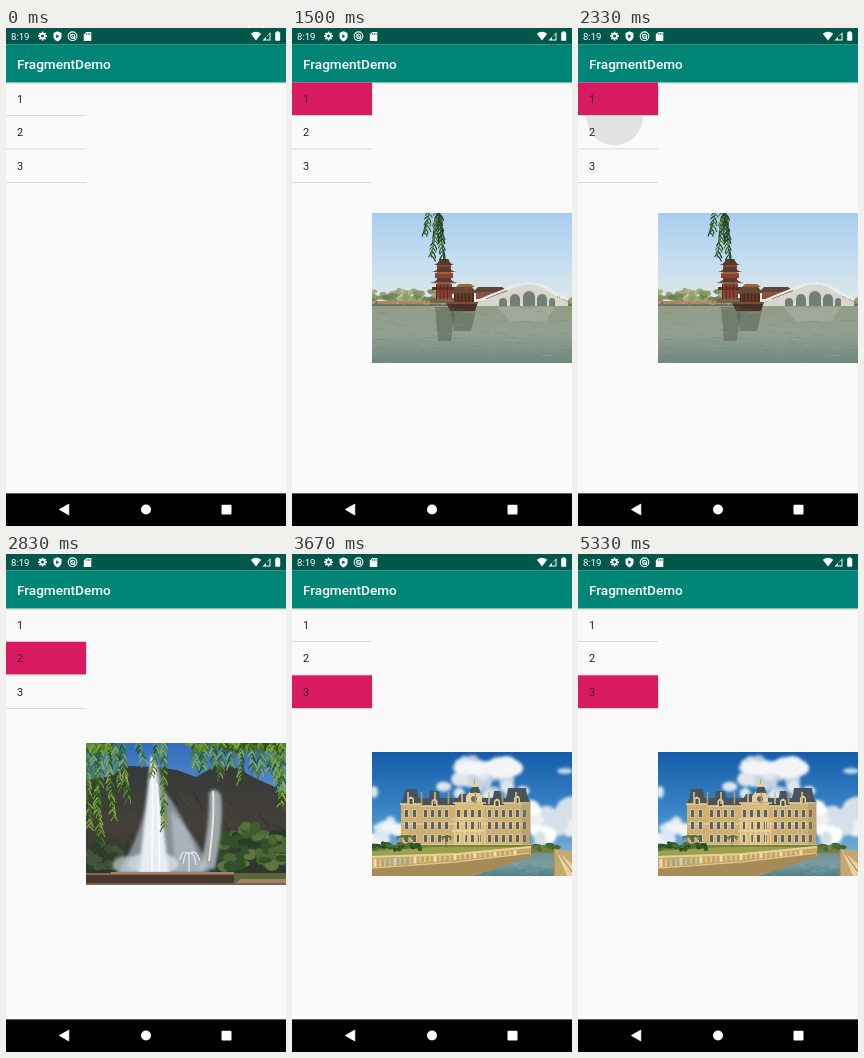
Animation of 280 by 498 pixels, one loop 5490 ms. Source, as an HTML page:

```html
<!DOCTYPE html>
<html lang="en">
<head>
<meta charset="utf-8">
<title>FragmentDemo</title>
<style>
html, body { margin: 0; width: 100%; height: 100%; overflow: hidden; background: #fafafa; }
#stage { display: block; width: 100vw; height: 100vh; }
text { font-family: Roboto, sans-serif; }
</style>
</head>
<body>
<svg id="stage" viewBox="0 0 280 498" preserveAspectRatio="none"></svg>
<script>
const LOOP = 5490;
const PICKS = [670, 2500, 3500];   // moment each row becomes active
const RIPPLE = [2330, 2500];

let seed = 7;
const rnd = (a = 0, b = 1) => {
  seed = (seed * 16807) % 2147483647;
  return a + (b - a) * seed / 2147483647;
};
const n = v => +v.toFixed(2);
const rect = (x, y, w, h, fill, more = '') =>
  `<rect x="${n(x)}" y="${n(y)}" width="${n(w)}" height="${n(h)}" fill="${fill}" ${more}/>`;
const path = (d, fill, more = '') => `<path d="${d}" fill="${fill}" ${more}/>`;
const line = (d, color, w = 1, more = '') =>
  `<path d="${d}" fill="none" stroke="${color}" stroke-width="${w}" ${more}/>`;
const oval = (x, y, rx, ry, fill, more = '') =>
  `<ellipse cx="${n(x)}" cy="${n(y)}" rx="${n(rx)}" ry="${n(ry)}" fill="${fill}" ${more}/>`;
const label = (x, y, size, fill, str, more = '') =>
  `<text x="${x}" y="${n(y)}" font-size="${size}" fill="${fill}" ${more}>${str}</text>`;
const times = (count, fn) => Array.from({ length: count }, (_, i) => fn(i)).join('');
const pick = list => list[Math.floor(rnd(0, list.length))];
const grad = (id, stops, dir = 'x2="0" y2="1"') =>
  `<linearGradient id="${id}" ${dir}>` + stops.map((c, i) =>
    `<stop offset="${i / (stops.length - 1)}" stop-color="${c}"/>`).join('') + '</linearGradient>';

// scattered blobs inside a box
const blobs = (count, x, y, w, h, r, colors, more = '') => times(count, () =>
  oval(rnd(x, x + w), rnd(y, y + h), rnd(r * .6, r * 1.3), rnd(r * .5, r), pick(colors), more));

// hanging branch with slim leaves
const branch = (x, y, len, lean, colors, size = 5) =>
  line(`M${n(x)} ${y}q${n(lean * .2)} ${n(len * .5)} ${n(lean)} ${n(len)}`, colors[0], .6) +
  times(Math.round(len / 1.9), i => {
    const k = i * 1.9 / len, side = i % 2 ? 1 : -1;
    const px = x + lean * k * (.4 + .6 * k), py = y + len * k;
    return line(`M${n(px)} ${n(py)}q${side * 2} 1 ${n(side * rnd(2, size * .8))} ${n(rnd(size * .6, size * 1.3))}`,
      pick(colors), 1.2, 'stroke-linecap="round"');
  });

const photo = (y, h, body) =>
  `<g class="photo" display="none"><svg x="80" y="${y}" width="200" height="${h}" viewBox="80 ${y} 200 ${h}">${body}</svg></g>`;

function lake() {
  const roof = (x, y, w, h) => path(
    `M${x - w} ${y + h}Q${x - w * .5} ${y + h * .7} ${x - w * .45} ${y}H${x + w * .45}Q${x + w * .5} ${y + h * .7} ${x + w} ${y + h}Z`, '#563b31');
  let s = rect(80, 185, 200, 92, 'url(#sky1)') + rect(80, 275, 200, 60, 'url(#water1)');
  s += blobs(45, 80, 262, 66, 11, 4, ['#8c9b62', '#77895a', '#a5a878', '#687a4c'], 'opacity=".75"');
  s += blobs(12, 258, 270, 22, 5, 3, ['#7d8960', '#969a76']);
  s += rect(80, 273, 110, 4, '#a58b68') + rect(80, 276, 200, 2, '#69725a');
  s += blobs(22, 80, 273, 75, 3, 1.5, ['#c69a72', '#776848', '#b67a5b']);
  // long hall
  s += rect(184, 263, 32, 8, '#8b5140') + path('M181 264l5-5h24l7 5z', '#5b4639') + rect(160, 259, 14, 7, '#8d4b36');
  // tower
  s += rect(145, 236, 14, 38, '#963f30') + roof(152, 231, 10, 6) + roof(152, 239, 12, 5) + roof(152, 250, 14, 5);
  s += rect(143, 245, 18, 5, '#8d3e2d') + rect(140, 259, 24, 3, '#613329') + rect(139, 270, 26, 5, '#756450');
  s += times(5, i => rect(144 + i * 3.7, 256, 1, 15, '#4f2b24')) + line('M143 245h18M141 255h23', '#b29565', .8);
  // bridge
  s += path('M180 277Q199 269 215 263Q239 251 256 263Q266 270 276 274V278H180Z', '#d8d7ce');
  s += line('M181 275Q199 267 215 261Q239 249 256 261Q266 268 276 272', '#f4f4ef', 2.2);
  s += line('M181 275Q199 267 215 261Q239 249 256 261Q266 268 276 272', '#aaa9a2', .6, 'stroke-dasharray="1 2"');
  s += [[211, 4, 8], [223, 5, 12], [237, 6, 15], [250, 5, 12], [260, 3, 8]].map(([x, w, h]) =>
    path(`M${x - w} 278V${278 - h + w}A${w} ${w} 0 0 1 ${x + w} ${278 - h + w}V278Z`, '#757d76')).join('');
  // boat
  s += path('M154 274h32l-3 9h-25z', '#4c3025') + rect(162, 264, 20, 12, '#66392a');
  s += path('M158 265l5-6h17l5 6z', '#634833') + path('M164 259l3-3h12l4 3z', '#9a6838');
  s += times(6, i => rect(162 + i * 3.6, 266, 1.3, 8, '#372a22')) + line('M154 275h31', '#9c6040', 1);
  // water
  s += path('M143 279h20l-4 34h-13z', '#4c5544', 'opacity=".45"') + path('M159 283h25l-5 20h-17z', '#414a39', 'opacity=".4"');
  s += path('M205 279h58l-9 14h-36z', '#c6cabd', 'opacity=".28"');
  s += times(95, () => {
    const x = rnd(80, 275), y = rnd(279, 335);
    return line(`M${n(x)} ${n(y)}h${n(rnd(4, 15))}`, pick(['#a9b6a5', '#617466']), .6, 'opacity=".35"');
  });
  const leaf = ['#31522a', '#496d32', '#203e20'];
  return s + branch(145, 184, 46, -6, leaf) + branch(147, 185, 47, 5, leaf) + branch(137, 184, 22, -5, leaf) + branch(148, 185, 28, 2, leaf);
}

function fountain() {
  let s = rect(80, 189, 200, 142, 'url(#sky2)');
  s += path('M80 226L104 222 123 212 151 213 171 216 190 223 211 211 231 214 249 224 280 238V331H80Z', 'url(#hill)');
  s += times(38, () => line(`M${n(rnd(80, 270))} ${n(rnd(238, 292))}l${n(rnd(5, 14))} ${n(rnd(6, 18))}`, pick(['#454746', '#242a2c', '#544c42']), 2, 'opacity=".35"'));
  s += blobs(55, 218, 279, 62, 34, 6, ['#34502a', '#496833', '#263c24', '#5d7640']);
  s += blobs(14, 235, 272, 18, 12, 5, ['#54723a', '#3f5d2d']);
  s += blobs(20, 80, 291, 37, 22, 5, ['#2b4127', '#37512c', '#42543a']);
  // spray
  s += '<g filter="url(#soft)">' + path('M145 207Q154 206 158 237Q178 260 199 319H112Q132 286 139 255Z', '#aebdca', 'opacity=".65"');
  s += path('M145 201Q150 202 153 240L163 319H133L141 244Z', '#eef4fa', 'opacity=".95"');
  s += path('M203 239Q208 231 215 241Q218 270 209 315H194Q204 270 203 239Z', '#d5dfe7', 'opacity=".65"');
  s += path('M165 257Q195 286 204 319H169Z', '#ccd6df', 'opacity=".48"');
  s += oval(147, 310, 25, 12, '#e5edf4', 'opacity=".7"') + oval(121, 311, 14, 9, '#c4d0d8', 'opacity=".7"') + '</g>';
  s += line('M146 203Q147 250 146 317M151 230Q154 270 153 317M207 237Q209 260 203 307', '#fff', 2, 'opacity=".7"');
  s += line('M183 318V300Q176 294 174 306M183 300Q190 294 194 307M183 300Q180 294 177 310M183 300Q188 296 190 311', '#f3f7fa', 1.2, 'opacity=".8"');
  s += rect(80, 319, 148, 3, '#8a6954') + rect(80, 321, 148, 10, '#49372d') + rect(105, 318, 123, 2, '#a3836b');
  s += rect(228, 319, 52, 12, '#5a673d') + path('M227 331l8-6h45v6z', '#aa8064') + rect(80, 329, 200, 2, '#776454');
  const leaf = ['#467429', '#6d9a35', '#28501f', '#8db347'];
  s += blobs(28, 80, 188, 24, 9, 5, ['#375c26', '#5b8734']) + blobs(34, 181, 188, 99, 7, 5, ['#426b28', '#648c35', '#31521f']);
  s += times(6, i => branch(81 + i * 7, 187, 88 - i * 10 + (i % 2) * 20, rnd(-5, 8), leaf, 6));
  s += branch(158, 188, 86, 0, leaf) + branch(151, 188, 37, -7, leaf) + branch(133, 188, 20, 6, leaf);
  return s + times(10, i => branch(188 + i * 9.5, 187, rnd(25, 42), rnd(-4, 4), leaf, 6)) +
    branch(268, 188, 56, 8, leaf, 6) + branch(278, 188, 66, -3, leaf, 6);
}

function palace() {
  const stone = '#cdb075', pale = '#e6cf98', slate = '#48545c';
  const wing = (x, w, top) => rect(x, top, w, 291 - top, stone) +
    path(`M${x - 1} ${top}q4-5 5-15h${w - 8}q1 10 5 15z`, slate) + line(`M${x - 1} ${top}h${w + 2}`, pale, 1.6) +
    path(`M${x + w / 2 - 3} ${top}v-5q3-5 6 0v5z`, pale) + rect(x + w / 2 - 1.5, top - 5, 3, 5, '#48515a');
  const windows = (x, count, step, y) => times(count, i =>
    rect(x + i * step - .6, y - .7, 4.2, 8.2, pale) + rect(x + i * step, y, 3, 7, '#596166'));
  let s = rect(80, 198, 200, 124, 'url(#sky3)');
  s += '<g filter="url(#soft)">' + blobs(30, 164, 206, 64, 22, 8, ['#d8e1eb', '#f0f3f6', '#b7c9da']);
  s += blobs(16, 150, 222, 84, 22, 7, ['#c3d3e2', '#dfe6ee']);
  s += blobs(21, 238, 252, 42, 36, 10, ['#eef1f4', '#d7e0e8', '#fff']) + blobs(9, 80, 268, 27, 18, 8, ['#dce7f0', '#f0f4f7']);
  s += oval(181, 214, 18, 7, '#f4f6f7') + oval(211, 214, 20, 10, '#f2f4f6') + oval(273, 217, 8, 3, '#c1d9ed') + oval(82, 238, 4, 6, '#dbe7f2') + '</g>';
  s += rect(117, 252, 112, 41, stone) + path('M121 252l4-8h101l4 8z', slate) + line('M118 252h112', pale, 1.6);
  s += wing(109, 20, 250) + wing(134, 17, 252) + wing(198, 14, 252) + wing(212, 26, 249);
  // centre
  s += rect(163, 248, 28, 44, '#d8bb7d') + path('M163 249l5-9h20l5 9z', slate);
  s += path('M174 248v-6q8-12 16 0v6z', pale) + path('M178 239q0-6 5-8q5 2 5 8z', slate) + rect(180, 228, 5, 5, pale) + line('M182.5 225v5', '#c6ab70', 1);
  s += oval(182, 245, 3, 3, '#626a6c') + line('M161 249h33M160 265h35M110 270h127M109 291h130', pale, 1.4);
  s += times(9, i => line(`M${116 + i * 13.5} 250v-12`, i % 2 ? '#b7995f' : '#d8bf86', 1.6));
  [256, 268, 281].forEach(y => {
    s += windows(113, 2, 8, y) + windows(132, 4, 7, y) + windows(165, 4, 7, y) + windows(196, 6, 7, y);
  });
  s += times(7, i => rect(162 + i * 5, 267, 1.3, 24, pale)) + rect(160, 276, 33, 2, pale);
  s += path('M230 249h9v43h-9z', '#96835e', 'opacity=".35"');
  // grounds
  s += rect(80, 291, 182, 10, '#73813f') + path('M80 297L144 293H232L182 301 80 306Z', '#9aa04b');
  s += blobs(28, 80, 289, 48, 6, 3, ['#315727', '#47702e', '#234821']) + blobs(12, 240, 291, 40, 5, 3, ['#456837', '#5f7543']);
  s += [109, 116, 154].map(x => line(`M${x} 294v-11`, '#7d6744', .8) +
    line(`M${x - 4} 286q4-6 4-3q1-4 5 3m-5-3q-4-1-5 1m5-1q4-2 6 1`, '#557331', 1.2)).join('');
  s += path('M235 299H262L267 322H149Z', 'url(#water3)');
  s += path('M80 302L166 299 239 292V302L180 322H80Z', '#c4a666') + path('M80 313L163 307 238 298V303L181 322H80Z', '#a78b56');
  s += line('M80 303L166 300 239 293', '#ead09a', 2) + line('M80 314L163 308 238 299', '#e2c486', 1.6);
  s += times(29, i => {
    const x = 83 + i * 5, y = 305 - i * .31;
    return line(`M${x} ${n(y)}v${n(8 - i * .13)}`, i % 4 ? '#e4cb91' : '#f2ddb0', i % 4 ? 1.5 : 3);
  });
  s += rect(91, 303, 27, 9, '#83a4a1', 'opacity=".25"');
  s += times(33, () => line(`M${n(rnd(180, 253))} ${n(rnd(309, 322))}h${n(rnd(3, 10))}`, pick(['#a9bdbc', '#547f87']), .7, 'opacity=".45"'));
  return s + path('M262 295l18 2v25h-18z', '#c5a76f') + path('M264 296l16 14v12h-5z', '#ead3a0') +
    line('M262 296V322M266 298L280 318', '#a48a58', 1.2);
}

// interface measures follow a 1080 px wide screen
const px = v => v * 280 / 1080;
const LIST_W = px(309), ROW_H = px(126), GAP = px(3), BAR_Y = px(63), BAR_END = px(210), NAV_Y = px(1795);

const gear = times(4, i => `<rect x="35.7" y="3.7" width="1.7" height="8.8" fill="#fff" transform="rotate(${i * 45} 36.5 8.1)"/>`) +
  oval(36.5, 8.1, 3, 3, '#fff') + oval(36.5, 8.1, 1.5, 1.5, '#00574b');
const statusBar = rect(0, 0, 280, BAR_Y, '#00574b') + label(5, 11.8, 9.6, '#fff', '8:19') + gear +
  path('M51.5 3.3l4 1.6v3.3q0 3.5-4 5.2q-4-1.7-4-5.2V4.9z', '#fff') + path('M50.2 6.3v4l3.2-2z', '#00574b') +
  '<circle cx="66.5" cy="8.2" r="4.3" fill="none" stroke="#fff" stroke-width="1.1"/>' +
  '<circle cx="66.7" cy="8.2" r="2" fill="none" stroke="#fff" stroke-width="1.1"/>' + line('M64 5.4l5 5.6', '#fff', .9) +
  path('M80.3 4h5v9h-7.5V6.6z', '#fff') + line('M80.6 5v2M82.3 5v2M84 5v2', '#00574b', .7) +
  path('M244.8 5.8q5.2-4 10.4 0L250 12.4z', '#fff') +
  path('M256.5 12.4h8V4.2z', '#fff') + path('M260 11.5v-2.8l3.5-2.5v5.3z', '#00574b') +
  rect(270.4, 3.4, 2.6, 1.5, '#fff') + rect(269.2, 4.3, 5, 8.4, '#fff', 'rx=".6"');
const appBar = rect(0, BAR_END, 280, 2.5, 'url(#shade)') + rect(0, BAR_Y, 280, BAR_END - BAR_Y, '#008577') +
  label(10.9, 40.5, 13.6, '#fff', 'FragmentDemo', 'font-weight="500"');
const navBar = rect(0, NAV_Y, 280, 498 - NAV_Y, '#000') + path('M53.4 481.5l9.4-5.4v10.8z', '#fff', 'stroke="#fff" stroke-width=".8" stroke-linejoin="round"') +
  oval(140, 481.5, 5, 5, '#fff') + rect(215.5, 476.7, 10, 9.8, '#fff', 'rx="1"');

const rowTop = i => BAR_END + i * (ROW_H + GAP);
const rows = times(3, i => rect(0, rowTop(i), LIST_W, ROW_H, '#d81b60', 'class="active" display="none"') +
  rect(0, rowTop(i) + ROW_H, LIST_W, GAP, '#d0d0d0') + label(10.9, rowTop(i) + 20.5, 10.9, '#212121', i + 1, 'class="num"'));

const stage = document.getElementById('stage');
stage.innerHTML = '<defs>' +
  grad('sky1', ['#a8cdef', '#c3ddf0', '#e1e9e9']) + grad('water1', ['#929c85', '#91a091', '#71877e']) +
  grad('sky2', ['#326cbc', '#6b9cd1', '#8eaec9']) + grad('hill', ['#363a3b', '#443f38', '#283226']) +
  grad('sky3', ['#145caa', '#3d89c8', '#9bc2df']) + grad('water3', ['#738f91', '#789ba1', '#527f88']) +
  grad('shade', ['#d8d8d8', '#fafafa']) +
  '<filter id="soft" x="-10%" y="-10%" width="120%" height="120%"><feGaussianBlur stdDeviation="1.4"/></filter></defs>' +
  rect(0, 0, 280, 498, '#fafafa') + appBar +
  '<circle id="ripple" cx="36.5" cy="89" r="28.2" fill="#e2e2e2" display="none"/>' + rows +
  photo(185, 150, lake()) + photo(189, 142, fountain()) + photo(198, 124, palace()) + statusBar + navBar;

const all = sel => [...stage.querySelectorAll(sel)];
const actives = all('.active'), photos = all('.photo'), nums = all('.num');
const ripple = document.getElementById('ripple');
const show = (el, on) => el.setAttribute('display', on ? 'inline' : 'none');

function render(t) {
  const current = PICKS.filter(p => t >= p).length - 1;
  PICKS.forEach((_, i) => {
    show(actives[i], i === current);
    show(photos[i], i === current);
    nums[i].setAttribute('fill', i === current ? '#44202a' : '#212121');
  });
  show(ripple, t >= RIPPLE[0] && t < RIPPLE[1]);
}

const start = performance.now();
function tick() {
  render((performance.now() - start) % LOOP);
  requestAnimationFrame(tick);
}
tick();
</script>
</body>
</html>
```
